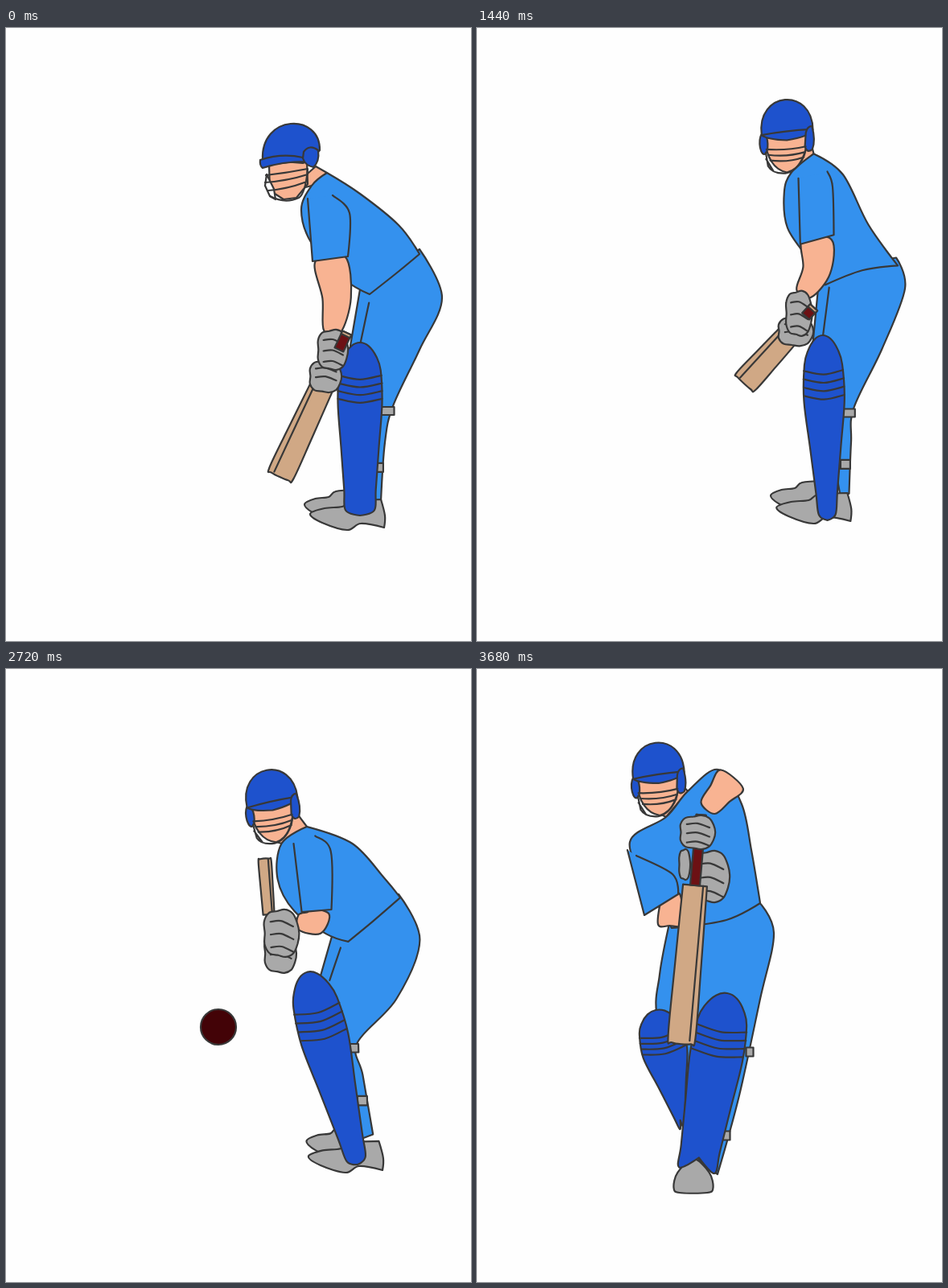
These frames come from a looping animation (578x762 px, 3840 ms). An HTML page:

```html
<!DOCTYPE html>
<html lang="en">
<head>
<meta charset="utf-8">
<title>Batsman</title>
<style>
html, body { margin: 0; width: 100%; height: 100%; overflow: hidden; background: #fefefe; }
svg { display: block; width: 100vw; height: 100vh; }
.o { stroke: #383838; stroke-width: 2.2; stroke-linejoin: round; stroke-linecap: round; }
.l { fill: none; }
.navy { fill: #1e52cd; }
.skin { fill: #f8b392; }
</style>
</head>
<body>
<svg viewBox="0 0 578 762">
  <defs>
    <g id="front" class="o">
      <path class="skin" d="M-27 4C-27 28 -18 44 -2 48C14 45 25 28 25 3Z"/>
      <ellipse class="navy" cx="-29" cy="11" rx="5" ry="13"/>
      <path class="navy" d="M-31 0C-35 -55 35 -57 33 -3Q28 5 0 8Q-24 6 -31 0Z"/>
      <path class="l" d="M-31 0Q-2 -4 31 -4"/>
      <path class="navy" d="M24 0Q26 -8 32 -8Q36 10 31 21Q24 26 22 17Z"/>
      <path class="l" d="M-26 18Q0 21 23 17M-24 25Q0 29 21 24M-22 32Q0 36 20 30M-27 22L-25 39Q-20 49 -4 49Q14 47 23 20M-27 30L-19 45"/>
    </g>
    <g id="side" class="o">
      <path class="skin" d="M-28 8L-27 40L-10 51L6 49L20 32L19 2Z"/>
      <path class="navy" d="M-36 2C-39 -55 36 -57 35 -10L24 2L14 6Z"/>
      <path class="navy" d="M-39 2Q-12 -7 14 -1L17 4Q-12 4 -36 12Q-40 9 -39 2Z"/>
      <path class="navy" d="M15 -8Q22 -18 33 -10Q35 4 27 11Q17 9 14 0Z"/>
      <path fill="#fff" d="M-31 20L-33 34L-27 47L-20 51L-22 38Z"/>
      <path class="l" d="M-32 21Q-5 18 20 13M-33 30Q-5 28 20 20M-29 40Q-5 38 16 30M-27 47Q-8 57 9 49Q17 44 20 14"/>
    </g>
  </defs>
  <g id="scene"></g>
</svg>
<script>
const BLUE = '#3491ee', NAVY = '#1e52cd', GREY = '#a9a9a9', SKIN = '#f8b392',
      WOOD = '#d0a885', RED = '#6c1114', BALL = '#430307', NONE = 'none';
const STEP = 160, STEPS = 24;

// Key poses. at: step, ease: power of the move to the next pose.
// head: x y turn; pad: top, bottom, width, foot ratio; gloves: x y w h;
// bat: neck x y, angle, length, width; grip: span of handle behind the neck.
const SIDE = [{
  at: 0, ease: .85, head: [355, 162, 0], toe: [378, 604], farToe: [371, 592],
  legs: [440, 325, 428, 395, 459, 588, 466, 588, 471, 515, 481, 470, 514, 400, 542, 335, 514, 275],
  torso: [399, 180, 440, 206, 488, 245, 514, 281, 485, 305, 452, 331, 420, 312, 380, 268, 367, 226, 380, 196],
  sleeve: [375, 212, 381, 290, 425, 284, 427, 230, 406, 208],
  pad: [440, 391, 440, 606, 55, .65], gloveA: [406, 400, 38, 50], gloveB: [397, 433, 40, 40],
  bat: [392, 447, 115, 122, 33], grip: [52, 75]
}, {
  at: 3, ease: 1, head: [388, 120, 0], toe: [377, 604], farToe: [363, 588],
  legs: [416, 300, 414, 392, 448, 585, 457, 585, 463, 520, 460, 482, 500, 398, 522, 328, 500, 270],
  torso: [414, 150, 446, 163, 482, 225, 508, 272, 465, 299, 415, 308, 408, 275, 388, 243, 384, 198, 392, 171],
  sleeve: [408, 168, 406, 252, 451, 245, 446, 190, 429, 160],
  pad: [429, 387, 433, 607, 50, .72], gloveA: [405, 338, 28, 50], gloveB: [388, 346, 24, 42],
  bat: [383, 352, 172, 76, 26], grip: [30, 46]
}, {
  at: 7, ease: 2, head: [391, 119, -3], toe: [370, 594], farToe: [362, 584],
  legs: [422, 295, 414, 392, 450, 577, 462, 577, 463, 515, 463, 474, 498, 395, 525, 320, 518, 288],
  torso: [424, 143, 458, 168, 482, 240, 520, 299, 475, 297, 425, 312, 408, 275, 387, 234, 386, 190, 394, 168],
  sleeve: [407, 175, 406, 257, 449, 243, 448, 185, 442, 165],
  pad: [426, 381, 434, 611, 48, .4], gloveA: [399, 336, 30, 56], gloveB: [397, 354, 46, 36],
  bat: [387, 354, 141, 66, 31], grip: [30, 50]
}, {
  at: 11, ease: 5, head: [366, 169, -3], toe: [379, 602], farToe: [374, 572],
  legs: [438, 328, 428, 390, 454, 582, 464, 584, 471, 515, 484, 468, 520, 410, 553, 335, 530, 278],
  torso: [402, 196, 445, 224, 500, 258, 532, 284, 490, 314, 457, 341, 425, 325, 382, 290, 369, 250, 380, 216],
  sleeve: [377, 222, 389, 304, 427, 300, 424, 235, 416, 219],
  pad: [440, 385, 440, 614, 58, .45], gloveA: [403, 411, 42, 56], gloveB: [393, 446, 38, 38],
  bat: [392, 460, 107, 134, 34], grip: [30, 30]
}, {
  at: 15, ease: 1, head: [341, 189, -9], toe: [376, 606], farToe: [374, 588],
  legs: [412, 345, 394, 400, 443, 585, 457, 580, 446, 510, 440, 472, 490, 420, 521, 350, 496, 296],
  torso: [384, 216, 440, 236, 478, 276, 498, 300, 462, 329, 432, 352, 405, 343, 366, 316, 346, 278, 352, 236],
  sleeve: [367, 236, 375, 317, 412, 314, 413, 245, 394, 227],
  pad: [380, 388, 437, 616, 60, .4], gloveA: [349, 342, 44, 56], gloveB: [347, 366, 40, 46],
  bat: [334, 320, 267, 66, 16], grip: [0, 0]
}];
// Boots here are x, sole y, width, height.
const FRONT = [{
  at: 19, ease: 1.2, head: [256, 133, 6], boot: [370, 629, 36, 68], farBoot: [297, 624, 54, 48],
  legs: [292, 300, 284, 355, 285, 395, 318, 580, 334, 462, 360, 565, 396, 555, 407, 470, 414, 400, 423, 298, 403, 268],
  torso: [325, 85, 348, 132, 371, 172, 403, 271, 360, 295, 310, 297, 262, 262, 236, 222, 248, 172, 290, 120],
  sleeve: [266, 208, 270, 214, 282, 222, 275, 217, 270, 212],
  pad: [353, 389, 369, 590, 66, .68], farPad: [299, 384, 299, 592, 62, .75], straps: [332, 461, 404, 453],
  upperArm: [311, 72, 34, 314, 95, 30, 318, 118, 18], arm: [303, 68, 34, 296, 90, 28, 288, 113, 22],
  farArm: [268, 225, 4, 274, 230, 4, 280, 235, 4], fold: [349, 328, 344, 392],
  gloveA: [280, 128, 46, 34], gloveB: [312, 176, 48, 46], thumb: [278, 182, 22, 24],
  bat: [296, 190, 83, 169, 38], grip: [18, 45]
}, {
  at: 23, ease: 1, head: [225, 134, -5], boot: [269, 651, 49, 42], farBoot: [264, 606, 10, 20],
  legs: [240, 312, 227, 380, 225, 440, 262, 570, 268, 600, 280, 615, 299, 628, 326, 530, 352, 410, 369, 328, 349, 288],
  torso: [300, 125, 329, 168, 341, 225, 352, 291, 310, 312, 242, 322, 215, 275, 190, 215, 235, 184, 262, 152],
  sleeve: [187, 225, 208, 306, 250, 280, 243, 255, 198, 232],
  pad: [311, 403, 272, 630, 66, .68], farPad: [222, 424, 256, 576, 56, .1], straps: [339, 476, 310, 580],
  upperArm: [314, 142, 30, 308, 148, 28, 302, 155, 24], arm: [317, 137, 36, 302, 155, 31, 287, 173, 22],
  farArm: [228, 298, 38, 240, 300, 38, 254, 299, 36], fold: [262, 330, 258, 392],
  gloveA: [274, 203, 44, 42], gloveB: [290, 258, 48, 64], thumb: [258, 243, 14, 38],
  bat: [271, 269, 95, 197, 34], grip: [0, 88]
}];

const mix = (a, b, k) => a + (b - a) * k;
const between = (p, q, k) => [mix(p[0], q[0], k), mix(p[1], q[1], k)];
const pairs = list => list.flatMap((v, i) => i % 2 ? [] : [[v, list[i + 1]]]);
let lift = 0;

// The upper body rises and leans; the feet stay.
function stretch([x, y]) {
  const w = Math.max(0, (610 - y) / 460);
  return [x - lift * w / 2, y - lift * w];
}

// Smooth outline through points; hard lists the corners.
function shape(points, fill, { open = false, hard = [] } = {}) {
  const pts = points.map(stretch), n = pts.length;
  const at = i => open ? pts[Math.max(0, Math.min(n - 1, i))] : pts[(i + n) % n];
  const handle = (i, dir) => {
    const s = hard === 'all' || hard.includes(i % n) ? 0 : dir / 6;
    return [0, 1].map(c => at(i)[c] + (at(i + 1)[c] - at(i - 1)[c]) * s);
  };
  let d = 'M' + pts[0];
  for (let i = 0; i < n - (open ? 1 : 0); i++)
    d += 'C' + [...handle(i, 1), ...handle(i + 1, -1), ...at(i + 1)].map(v => v.toFixed(1)).join(' ');
  return `<path class="o" fill="${fill}" d="${d}${open ? '' : 'Z'}"/>`;
}
const line = points => shape(points, NONE, { open: true });

// Local frame: along the axis and across it.
function frame([x, y], angle) {
  const c = Math.cos(angle), s = Math.sin(angle);
  return (along, across) => [x + along * c - across * s, y + along * s + across * c];
}

function box(x, y, w, h) {
  return shape([[x - w / 2, y - h / 2], [x + w / 2, y - h / 2], [x + w / 2, y + h / 2], [x - w / 2, y + h / 2]],
    GREY, { hard: 'all' });
}

function limb(spine) {
  const sides = [1, -1].map(side => spine.map(([x, y, w], i) => {
    const p = spine[Math.max(0, i - 1)], q = spine[Math.min(spine.length - 1, i + 1)];
    return frame([x, y], Math.atan2(q[1] - p[1], q[0] - p[0]))(0, side * w / 2);
  }));
  return shape([...sides[0], ...sides[1].reverse()], SKIN);
}
const limbOf = v => limb([0, 3, 6].map(i => v.slice(i, i + 3)));

function pad([x, y, bx, by, width, foot], tip) {
  const len = Math.hypot(bx - x, by - y);
  const put = frame([x, y], Math.atan2(by - y, bx - x));
  const half = t => width / 2 * (t < .25 ? Math.sqrt(1 - (1 - t * 4) ** 2)
                                         : mix(1, foot, Math.max(0, (t - .35) / .62)));
  const stops = [.02, .08, .16, .35, .6, .85, .97];
  const side = s => stops.map(t => put(t * len, s * half(t)));
  const body = [put(0, 0), ...side(-1), put(tip * len, 0), ...side(1).reverse()];
  const ribs = [.19, .235, .28, .325].map(t =>
    line([put(t * len, half(t)), put(t * len + 5, 0), put(t * len, -half(t))]));
  return shape(body, NAVY, { hard: [stops.length + 1] }) + ribs.join('');
}

const SHOE = pairs([0, 0, 18, -7, 40, -9, 52, -16, 88, -18, 93, 2, 92, 17, 63, 12, 46, 20, 15, 11]);
const shoe = ([x, y], size) => shape(SHOE.map(([a, b]) => [x + a * size, y + b]), GREY, { hard: [4, 6] });

const BOOT = pairs([-.5, -.15, -.4, -.6, 0, -1, .4, -.6, .5, -.15, .35, 0, -.35, 0]);
const boot = ([x, y, w, h]) => shape(BOOT.map(([a, b]) => [x + a * w, y + b * h]), GREY);

function glove([x, y, w, h], fingers = 3) {
  const rim = Array.from({ length: 14 }, (_, i) => {
    const a = i / 14 * 2 * Math.PI, c = Math.cos(a), s = Math.sin(a);
    const r = (Math.abs(c) ** 3 + Math.abs(s) ** 3) ** (-1 / 3) * (.97 + .04 * Math.cos(5 * a)) / 2;
    return [x + w * r * c, y + h * r * s];
  });
  let out = shape(rim, GREY);
  for (let i = 0; i < fingers; i++) {
    const fy = y + h * (.27 * i - .24);
    out += line([[x - w * .3, fy], [x, fy - 1], [x + w * .34, fy + h * .1]]);
  }
  return out;
}

const axis = ([x, y, deg]) => frame([x, y], deg * Math.PI / 180);

function bat(b, edge) {
  const put = axis(b), len = b[3], w = b[4];
  const body = [put(0, w * .44), put(len * .5, w * .48), put(len * .96, w * .5), put(len, w * .34),
    put(len, -w * .34), put(len * .96, -w * .5), put(len * .5, -w * .48), put(0, -w * .44)];
  return shape(body, WOOD, { hard: [0, 7] }) + line([put(0, w * edge), put(len * .98, w * edge)]);
}

function handle(b, [from, to]) {
  if (to - from < 1) return '';
  const put = axis(b), span = (p, q) => [put(-p, 6), put(-q, 6), put(-q, -6), put(-p, -6)];
  return shape(span(from, to), RED, { hard: 'all' }) + shape(span(to - 4, to), WOOD, { hard: 'all' });
}

function neck([hx, hy], front, back) {
  return shape([front, back, [hx + 30, hy + 10], [hx - 6, hy + 42]], SKIN, { hard: 'all' });
}

function head([x, y, turn], id) {
  const [px, py] = stretch([x, y]);
  return `<use href="#${id}" transform="translate(${px} ${py}) rotate(${turn})"/>`;
}

function sideArm(p) {
  const s = pairs(p.sleeve), [gx, gy, , h] = p.gloveA;
  const top = between(s[1], s[2], .5), w = Math.hypot(s[2][0] - s[1][0], s[2][1] - s[1][1]) * .84;
  const wrist = between([gx, gy], top, h * .45 / Math.hypot(top[0] - gx, top[1] - gy));
  const elbow = between(top, wrist, .45);
  return limb([[...top, w], [elbow[0] + 7, elbow[1] + 8, w * .95], [...wrist, w * .55]]);
}

const sleeve = p => shape(pairs(p.sleeve), BLUE, { open: true, hard: [1, 2] });

function drawSide(p, id) {
  const legs = pairs(p.legs), torso = pairs(p.torso);
  const knee = legs[5], ankle = between(legs[4], legs[3], .43);
  const crease = [.15, .5, .85].map(t => between(legs[0], legs[1], t)).map(([x, y], i) => [x + 13 - i, y + 6]);
  return shoe(p.farToe, .75) + shape(legs, BLUE, { hard: [0, 1, 2, 3, 8] }) +
    box(knee[0] - 7, knee[1] + 6, 17, 10) + box(ankle[0] - 6, ankle[1], 12, 11) +
    shoe(p.toe, 1) + line(crease) + pad(p.pad, 1) + neck(p.head, torso[9], torso[0]) +
    shape(torso, BLUE, { hard: [0, 3, 5] }) + sideArm(p) + sleeve(p) + head(p.head, id) +
    bat(p.bat, .27) + glove(p.gloveB, 2) + glove(p.gloveA) + handle(p.bat, p.grip);
}

function drawFront(p) {
  const torso = pairs(p.torso), straps = pairs(p.straps);
  return boot(p.farBoot) + boot(p.boot) + shape(pairs(p.legs), BLUE, { hard: [0, 3, 4, 5, 6, 10] }) +
    straps.map(([x, y]) => box(x, y, 9, 11)).join('') + line(pairs(p.fold)) +
    pad(p.farPad, .9) + pad(p.pad, .9) + neck(p.head, torso[8], torso[9]) +
    shape(torso, BLUE, { hard: [3, 5] }) + head(p.head, 'front') +
    limbOf(p.upperArm) + limbOf(p.arm) + limbOf(p.farArm) + sleeve(p) +
    glove(p.gloveB) + glove(p.thumb, 0) + bat(p.bat, -.3) + handle(p.bat, p.grip) + glove(p.gloveA);
}

function poseAt(poses, step) {
  const i = Math.max(0, poses.findLastIndex(p => p.at <= step));
  const a = poses[i], b = poses[i + 1] || a;
  const k = Math.max(0, (step - a.at) / (b.at - a.at || 1)) ** a.ease;
  const pose = {};
  for (const key in a)
    if (Array.isArray(a[key])) pose[key] = a === b ? a[key] : a[key].map((v, j) => mix(v, b[key][j], k));
  return pose;
}

function draw(step) {
  const flight = step - 15, flying = flight >= 0 && flight < 3;
  lift = flying ? 27 * Math.sin(flight * Math.PI / 3) : 0;
  let out = step < 18 ? drawSide(poseAt(SIDE, step), step < 2 ? 'side' : 'front')
                      : drawFront(poseAt(FRONT, step));
  if (flying)
    out += `<circle class="o" cx="${34 + 115 * flight}" cy="${535 - 45 * flight}" r="22" fill="${BALL}"/>`;
  document.getElementById('scene').innerHTML = out;
}

let shown = -1;
const start = performance.now();
function tick() {
  const step = Math.floor((performance.now() - start) / STEP) % STEPS;
  if (step !== shown) draw(shown = step);
  requestAnimationFrame(tick);
}
tick();
</script>
</body>
</html>
```
